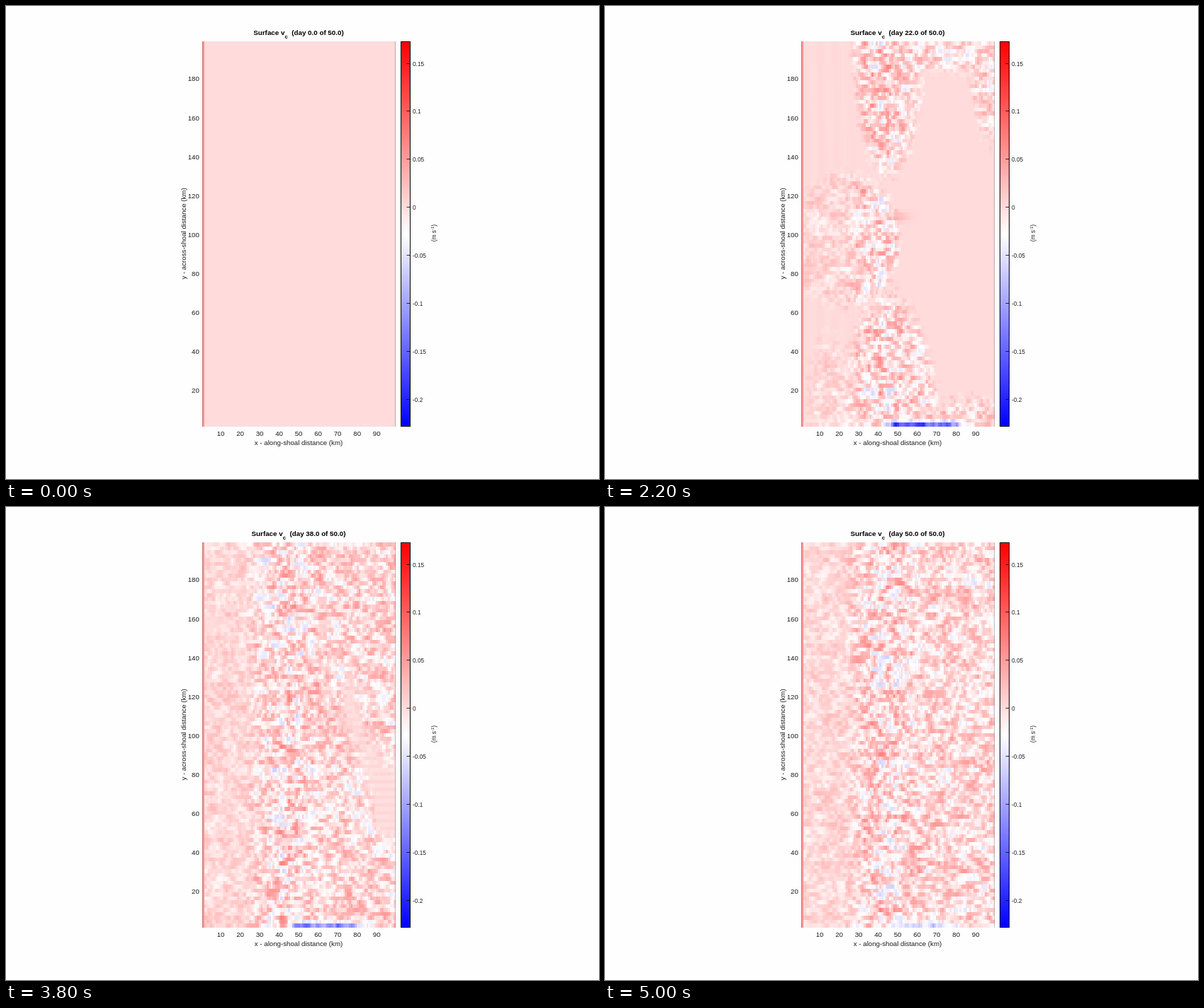
Animation of 837x669 px, one loop 5100 ms. Source, as an HTML page with a canvas:

```html
<!DOCTYPE html>
<html lang="en">
<head>
<meta charset="utf-8">
<title>Surface velocity</title>
<style>
  html, body { margin: 0; width: 100%; height: 100%; overflow: hidden; background: #fefefe; }
  canvas { position: absolute; left: 277px; top: 50px; width: 273px; height: 545px; image-rendering: pixelated; }
  svg { position: absolute; left: 0; top: 0; }
  text { font: 9.7px "Liberation Sans", Arial, sans-serif; fill: #1c1c1c; white-space: pre; }
  .title { font-weight: bold; font-size: 9.8px; fill: #000; }
  .small { font-size: 8.3px; }
  .middle { text-anchor: middle; }
  .end { text-anchor: end; }
</style>
</head>
<body>
<canvas id="field" width="99" height="99"></canvas>
<svg id="chart" width="837" height="669">
  <defs>
    <linearGradient id="scale" x2="0" y2="1">
      <stop stop-color="#f00"/><stop offset=".5" stop-color="#fff"/><stop offset="1" stop-color="#00f"/>
    </linearGradient>
  </defs>
  <path d="M277.5 50V595M549.5 50V595" stroke="#262626" stroke-opacity=".28"/>
  <rect x="557.5" y="50.5" width="13" height="544" fill="url(#scale)" stroke="#000"/>
  <text class="title middle" x="413" y="41">Surface v<tspan dy="5" font-size="7.8">c</tspan><tspan id="day" dy="-5"></tspan></text>
  <text class="middle" x="413" y="621">x - along-shoal distance (km)</text>
  <text class="middle" transform="translate(253.5 322) rotate(-90)">y - across-shoal distance (km)</text>
  <text class="small middle" transform="translate(606.5 321) rotate(-90)">(m s<tspan dy="-3" font-size="6">-1</tspan><tspan dy="3">)</tspan></text>
</svg>
<script>
const SIZE = 99, DAYS = 51, DAY_MS = 100;
const chart = document.getElementById('chart');
const dayLabel = document.getElementById('day');
const ctx = document.getElementById('field').getContext('2d');
const pixels = ctx.createImageData(SIZE, SIZE);

function add(tag, attrs, text = '') {
  const node = document.createElementNS('http://www.w3.org/2000/svg', tag);
  for (const key in attrs) node.setAttribute(key, attrs[key]);
  node.textContent = text;
  chart.append(node);
}
for (let km = 10; km <= 90; km += 10)
  add('text', { x: 275.5 + km * 2.752, y: 607.5, class: 'middle' }, km);
for (let km = 20; km <= 180; km += 20)
  add('text', { x: 272.8, y: 602 - km * 2.753, class: 'end' }, km);
for (let i = 0; i < 8; i++) {
  const y = 81.5 + i * 67.9;
  add('path', { d: `M565.5 ${Math.round(y) - .5}H571`, stroke: '#000', 'stroke-opacity': .8 });
  add('text', { x: 574, y: y + 3, class: 'small' }, +(0.15 - i * 0.05).toFixed(2));
}

const clamp = v => Math.max(0, Math.min(1, v));
const mix = (a, b, f) => a + (b - a) * f;
const smooth = v => (v = clamp(v)) * v * (3 - 2 * v);
const bell = (v, r) => Math.exp(-((v / r) ** 2));

function hash(i, j, k) {
  const s = Math.sin(i * 127.1 + j * 311.7 + k * 74.7) * 43758.5453;
  return s - Math.floor(s);
}
const eddy = (i, j, k, t) => Math.sin(6.283 * hash(i, j, k) + t * (.5 + .9 * hash(j, i, k + 9)));

function rowNoise(x, j, k, t) {
  const i = Math.floor(x);
  return mix(eddy(i, j, k, t), eddy(i + 1, j, k, t), x - i);
}
function coarseNoise(x, y, t) {
  const j = Math.floor(y);
  return mix(rowNoise(x, j, 5, t), rowNoise(x, j + 1, 5, t), y - j);
}

// Turbulence grows as ellipses: centre in km, first day, speeds in km per day.
const sources = [
  { x: 45, y: 200, day: 5, vx: 1.1, vy: 4 },
  { x: 45, y: 0, day: 5, vx: 1.5, vy: 4 },
  { x: 22, y: 97, day: 0, vx: 1.3, vy: 1.6 },
  { x: 15, y: 15, day: 14, vx: 1.5, vy: 4 },
  { x: 75, y: 200, day: 14, vx: 5, vy: 2 },
  { x: 99, y: 200, day: 9, vx: 1, vy: 4 },
  { x: 85, y: 0, day: 14, vx: 3, vy: 2 }
];
const onset = (x, y) => Math.min(...sources.map(s =>
  s.day + Math.hypot((x - s.x) / s.vx, (y - s.y) / s.vy)));

function velocity(col, row, t) {
  if (col === 0) return .055;
  if (t === 0) return 0;
  const x = col + 1, y = 198.3 - 2 * row;
  const lag = t - onset(x, y);
  const active = smooth((lag + 2 + 2 * (hash(col >> 1, row, 3) - .5)) / 5);
  const strength = mix(.015, .032, smooth((x - 20) / 14)) + .012 * bell(x - 43, 12);
  const fine = rowNoise(col / 1.7 + 3 * hash(row, 2, 1), row, 1, t);
  const coarse = coarseNoise(col / 4, row / 2, t);
  const streaks = .002 * Math.sin(x * .8 + Math.sin(y * .02 + t * .1)) * bell(x - 10, 20) * clamp(t / 12);
  const ripples = .003 * (row % 2 ? 1 : -1) * bell(lag + 2, 5) * smooth((x - 50) / 8) * smooth((t - 20) / 10);
  let v = mix(streaks + ripples, .002 + strength * (fine + .7 * coarse), active);

  // Early jets at the north edge and along the shoal, with return flow to the east.
  const early = bell(t - 14, 5);
  v += early * .065 * bell(x - 48, 11) * bell(y - 192, 4);
  v -= early * .035 * bell(x - 79, 15) * (bell(y - 198, 5) + bell(y - 4, 5));
  v += bell(t - 18, 6) * .05 * bell(x - 4 - 2 * t, 7) * bell(y - 109, 2.5);

  // Southern boundary current.
  if (row > 96) {
    const power = smooth((t - 8) / 12) * mix(.17, .07, clamp((t - 22) / 28));
    const band = smooth((x - 41) / 9) * smooth((92 - x) / 22);
    v -= power * band * (row === 98 ? 1 + .4 * coarse : .3);
  }
  return v;
}

function draw(day) {
  for (let row = 0, p = 0; row < SIZE; row++)
    for (let col = 0; col < SIZE; col++, p += 4) {
      const level = Math.max(-1, Math.min(1, (velocity(col, row, day) + .0283) / .2005));
      const fade = 255 * (1 - Math.abs(level));
      pixels.data[p] = level > 0 ? 255 : fade;
      pixels.data[p + 1] = fade;
      pixels.data[p + 2] = level > 0 ? fade : 255;
      pixels.data[p + 3] = 255;
    }
  ctx.putImageData(pixels, 0, 0);
  dayLabel.textContent = `  (day ${day.toFixed(1)} of 50.0)`;
}

let shown = -1;
const start = performance.now();
function tick() {
  const day = Math.floor((performance.now() - start) / DAY_MS) % DAYS;
  if (day !== shown) draw(shown = day);
  requestAnimationFrame(tick);
}
tick();
</script>
</body>
</html>
```
